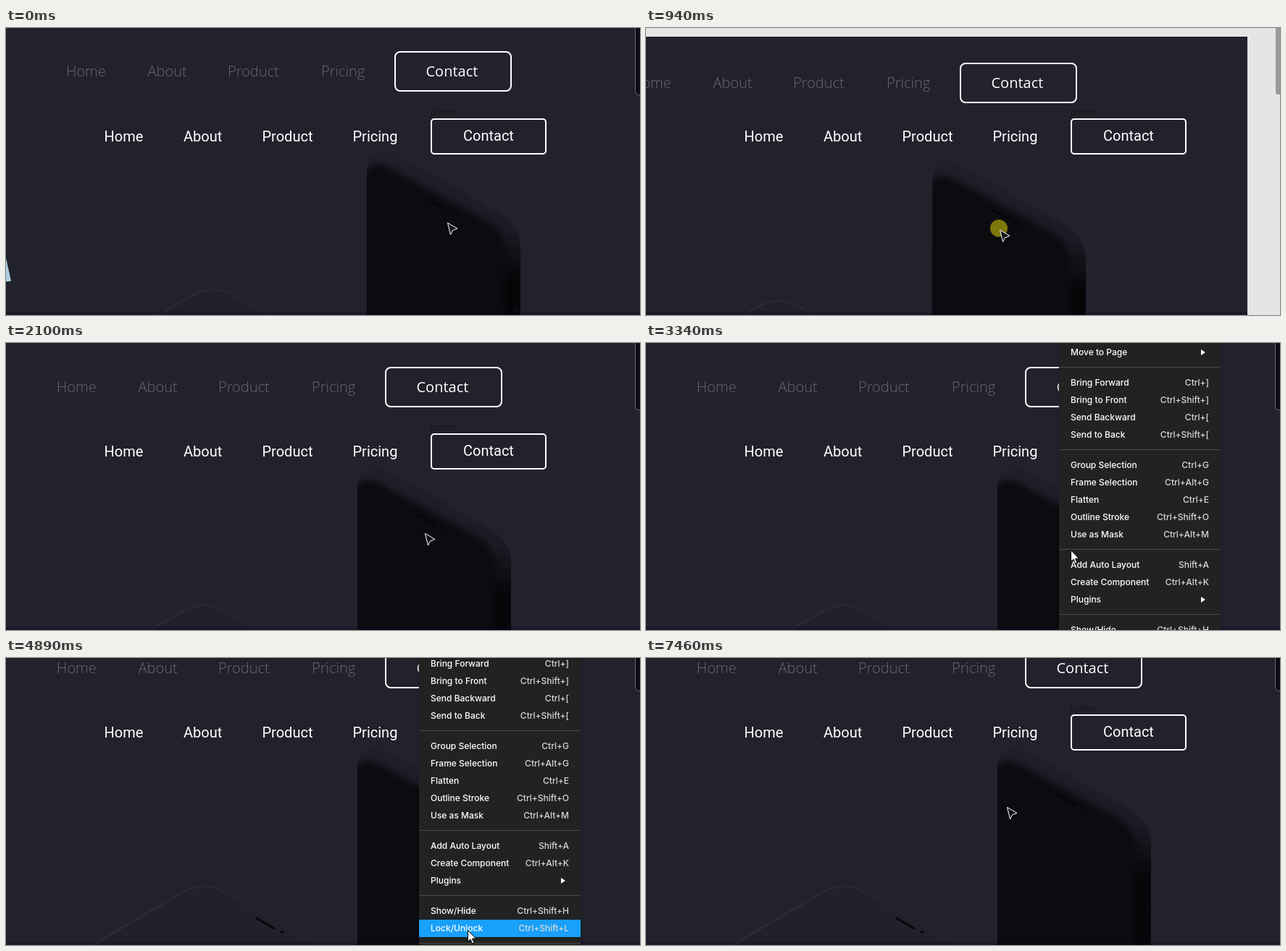
An HTML page for the animation above (9180 ms loop, 875 by 397 pixels).

```html
<!DOCTYPE html>
<html lang="en">
<head>
<meta charset="utf-8">
<title>Locking a reference layer</title>
<style>
  html, body { margin: 0; width: 100%; height: 100%; overflow: hidden; background: #e5e5e5; }
  svg { display: block; width: 875px; height: 397px; }
  .light { font: 300 20px "Open Sans", sans-serif; fill: #686873; }
  .light .active { font-weight: 400; fill: #fff; }
  .nav { font: 400 20px Roboto, sans-serif; fill: #fff; }
  .label { font: 400 11px Inter, sans-serif; fill: #16161d; }
  .outline { fill: none; stroke: #fff; stroke-width: 2; }
  #menu { font: 500 12px Inter, sans-serif; fill: #fff; filter: drop-shadow(0 1px 2px rgba(0, 0, 0, .35)); }
  .keys { fill: #d8d8d8; text-anchor: end; }
</style>
</head>
<body>
<svg viewBox="0 0 875 397">
  <defs>
    <linearGradient id="bezel" gradientUnits="userSpaceOnUse" x1="0" y1="170" x2="0" y2="350">
      <stop offset="0" stop-color="#20202b"/>
      <stop offset=".6" stop-color="#1b1b25"/>
      <stop offset="1" stop-color="#060608"/>
    </linearGradient>
    <linearGradient id="rim" gradientUnits="userSpaceOnUse" x1="113" y1="0" x2="440" y2="0">
      <stop offset="0" stop-color="#2d2d38"/>
      <stop offset=".5" stop-color="#2a2a35"/>
      <stop offset=".75" stop-color="#24242f"/>
      <stop offset="1" stop-color="#22222d"/>
    </linearGradient>
    <filter id="soft" color-interpolation-filters="sRGB"><feGaussianBlur stdDeviation="4"/></filter>
    <clipPath id="phoneClip"><use href="#phone"/></clipPath>
    <clipPath id="pageClip"><rect id="clipRect" x="-900" y="-4" width="1833" height="900"/></clipPath>
  </defs>

  <rect width="875" height="397" fill="#e5e5e5"/>

  <g id="page">
    <rect x="-900" y="-4" width="1833" height="900" fill="#22222d"/>
    <path d="M-4 300L7 350L-25 354Z" fill="#a9cfe0"/>
    <path d="M113 455L255 371Q285 353 315 370L460 455" fill="#21212b" stroke="url(#rim)" stroke-width="2.5"/>
    <path d="M359 406L383 420M393 425h2" stroke="#08080b" stroke-width="3" stroke-linecap="round"/>
    <path id="phone" d="M498 500V197Q498 172 520 170Q530 170 540 175L685 258Q710 275 710 305V500Z" fill="url(#bezel)"/>
    <g clip-path="url(#phoneClip)">
      <path d="M492 520V206Q500 180 526 192L667 269Q689 283 689 314V520Z" fill="#0c0b10" filter="url(#soft)"/>
      <path d="M702 393l6-6" stroke="#1a1a22"/>
    </g>
    <path d="M581 236L606 249M613 252l2 4" stroke="#050507" stroke-width="2.5" stroke-linecap="round"/>
    <g class="light">
      <text x="83" y="67">Home</text>
      <text x="195.500" y="67">About</text>
      <text x="306" y="67">Product</text>
      <text x="435" y="67">Pricing</text>
      <text class="active" x="579.500" y="67">Contact</text>
    </g>
    <rect class="outline" x="537" y="33" width="160" height="54" rx="7"/>
  </g>

  <g id="overlay">
    <rect x="869" y="-60" width="12" height="152" rx="3" fill="#999"/>
    <g clip-path="url(#pageClip)">
      <rect x="868.5" y="-60" width="14" height="152.5" rx="5" fill="#0d0d16" stroke="#686872"/>
    </g>
    <g class="nav">
      <text x="135.500" y="157">Home</text>
      <text x="245" y="157">About</text>
      <text x="353.500" y="157">Product</text>
      <text x="478.500" y="157">Pricing</text>
      <text x="631" y="156">Contact</text>
    </g>
    <text class="label" x="586" y="121">button</text>
    <rect class="outline" x="587" y="126" width="158" height="48" rx="4"/>
  </g>

  <rect id="strip" y="392" height="5" fill="rgba(20,0,36,.3)"/>

  <g id="menu">
    <rect x="570" y="-20" width="223" height="560" fill="#222"/>
    <rect id="hover" x="570" width="223" height="24" fill="#18a0fb"/>
  </g>

  <g id="cursor">
    <circle id="press" cx="-1" cy="-2" r="12" fill="rgba(228,220,6,.52)"/>
    <path id="pointer" d="M.5.5L14 8.500L7.500 11L4.500 17Z" fill="#131319" stroke="#fff" stroke-linejoin="round"/>
    <path id="arrow" d="M.5.5V16.500L4 13L6.500 19L9 18L6.500 12.200H11.500Z" fill="#fff" stroke="#000"/>
  </g>
</svg>

<script>
const LOOP = 9180, TICKS = 118, TICK = LOOP / TICKS;
const GRAB = [591, 263];
const $ = id => document.getElementById(id);

// Keys are [tick, x, y]; the view track holds only the vertical scroll.
const DRAG = [[2, 0, 0], [6, -148, 10], [8, -163, 13], [12, -103, 16], [18, 4, 14], [19, 4, 14], [26, -13, 1]];
const VIEW = [[45, 0], [49, -39], [51, -45], [52, -45], [54, -47]];
const CURSOR = [
  [0, 609, 269], [2, 591, 263], [27, 578, 263], [42, 578, 263], [49, 637, 422], [51, 637, 424],
  [62, 637, 424], [63, 637, 423], [64, 637, 423], [65, 637, 422], [71, 637, 422], [72, 638, 423],
  [76, 638, 423], [79, 654, 395], [82, 600, 297], [85, 480, 236], [88, 384, 260], [92, 552, 240], [96, 498, 253]
];

const MENU = [
  [["Move to Page", "▸"]],
  [["Bring Forward", "Ctrl+]"], ["Bring to Front", "Ctrl+Shift+]"], ["Send Backward", "Ctrl+["], ["Send to Back", "Ctrl+Shift+["]],
  [["Group Selection", "Ctrl+G"], ["Frame Selection", "Ctrl+Alt+G"], ["Flatten", "Ctrl+E"],
   ["Outline Stroke", "Ctrl+Shift+O"], ["Use as Mask", "Ctrl+Alt+M"]],
  [["Add Auto Layout", "Shift+A"], ["Create Component", "Ctrl+Alt+K"], ["Plugins", "▸"]],
  [["Show/Hide", "Ctrl+Shift+H"], ["Lock/Unlock", "Ctrl+Shift+L"]]
];

function add(name, attributes, text = "") {
  const node = document.createElementNS("http://www.w3.org/2000/svg", name);
  for (const key in attributes) node.setAttribute(key, attributes[key]);
  node.textContent = text;
  $("menu").append(node);
}

const rows = [];
let rowY = 13;
for (const group of MENU) {
  for (const [title, keys] of group) {
    add("text", { x: 586, y: rowY + 4 }, title);
    if (keys === "▸") add("path", { d: `M766 ${rowY - 4}l6 4l-6 4Z` });
    else add("text", { x: 777, y: rowY + 4, class: "keys" }, keys);
    rows.push(rowY);
    rowY += 24;
  }
  add("rect", { x: 570, y: rowY - 4, width: 223, height: 1, fill: "#4b4b4b" });
  rowY += 18;
}

function sample(keys, tick) {
  const next = keys.findIndex(key => key[0] > tick);
  if (next === 0) return keys[0].slice(1);
  if (next < 0) return keys[keys.length - 1].slice(1);
  const a = keys[next - 1], b = keys[next];
  const p = (tick - a[0]) / (b[0] - a[0]);
  return a.slice(1).map((v, i) => Math.round(v + (b[i + 1] - v) * p));
}

const within = (tick, from, to) => tick >= from && tick <= to;
const move = (id, x, y) => $(id).setAttribute("transform", `translate(${x} ${y})`);
const show = (id, on) => $(id).style.display = on ? "" : "none";

function draw(tick) {
  const [dx, dy] = sample(DRAG, tick);
  const [scroll] = sample(VIEW, tick);
  const dragging = within(tick, 2, 26);
  const [x, y] = dragging ? [GRAB[0] + dx, GRAB[1] + dy] : sample(CURSOR, tick);
  const menuOpen = within(tick, 35, 71);

  move("page", dx, dy + scroll);
  move("clipRect", dx, dy);
  move("overlay", 0, scroll);
  $("strip").setAttribute("width", 933 + dx);

  move("menu", 0, scroll);
  show("menu", menuOpen);
  $("menu").style.opacity = tick === 35 || tick === 71 ? .5 : 1;
  const row = rows.find(center => Math.abs(center - y) <= 12);
  show("hover", row !== undefined && tick >= 43);
  if (row !== undefined) $("hover").setAttribute("y", row - 12);

  move("cursor", x, y + scroll);
  show("press", dragging || within(tick, 69, 71));
  show("arrow", menuOpen);
  show("pointer", !menuOpen);
}

function frame() {
  const time = performance.now() % LOOP;
  draw(Math.floor((time + 14) / TICK));
  requestAnimationFrame(frame);
}
frame();
</script>
</body>
</html>
```
